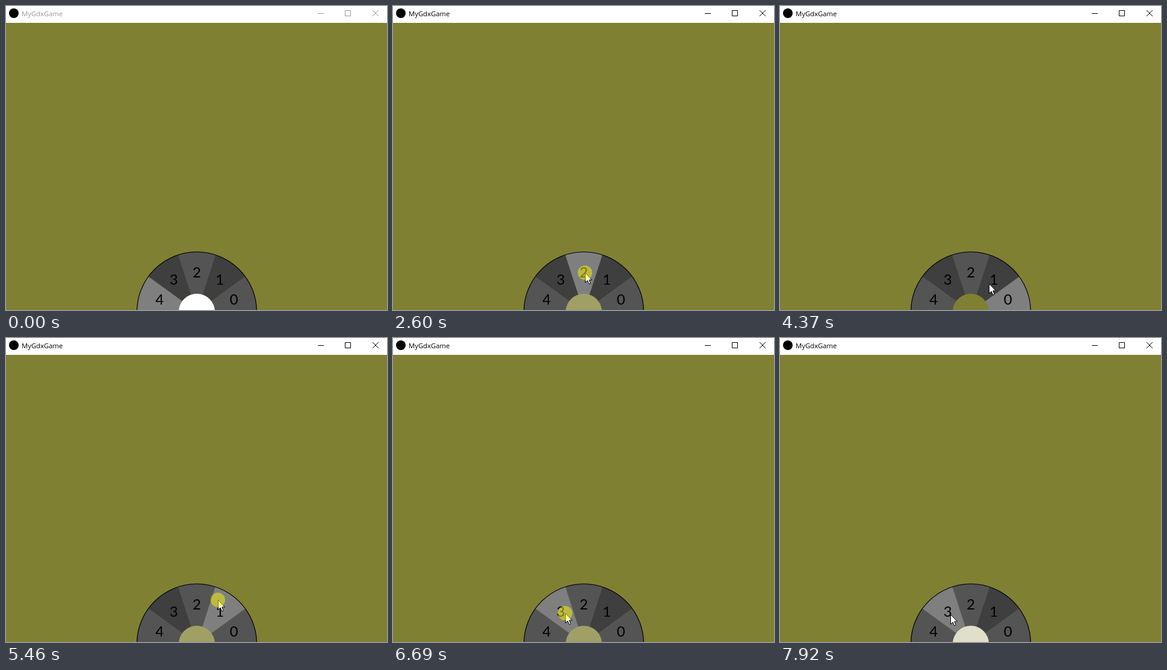
Animation of 633 by 505 pixels, one loop 8 s. Source, as an HTML page with a canvas:

```html
<!DOCTYPE html>
<html lang="en">
<head>
<meta charset="utf-8">
<title>MyGdxGame</title>
<style>
  html, body { margin: 0; width: 100%; height: 100%; overflow: hidden; background: #808033; }
  canvas { display: block; }
</style>
</head>
<body>
<canvas id="stage" width="633" height="505"></canvas>
<script>
const ctx = document.getElementById('stage').getContext('2d');
const LOOP = 8000, FOCUS_AT = 70;
const CX = 317, CY = 508, OUTER = 100, INNER = 30, SLICE = Math.PI / 5;

// The pointer travels in wheel coordinates: angle in slices, distance from the hub.
const stops = [], presses = [];
const moveTo = (time, slice, radius = 60) => stops.push({ time, slice, radius });
const press = (start, end) => presses.push({ start, end });
function click(start, end) {
  const { slice, radius } = stops[stops.length - 1];
  moveTo(end, slice, radius);
  press(start, end);
}

moveTo(150, 0.3, 280);
moveTo(860, 2, 180);
moveTo(1210, 1.84, 114);
moveTo(1670, 1.8);   click(2070, 2370);
moveTo(2520, 2.44, 65); click(2520, 2690);
moveTo(2850, 3.45);  click(2850, 3000);
moveTo(3300, 4.24, 46); click(3450, 3600);
moveTo(3960, 0.76);  click(3980, 4140);
moveTo(4370, 1.59, 56);
moveTo(4700, 1.84);  click(4810, 5000);
click(5150, 5230);

// Drag out of the wheel, then sweep back and forth over it
moveTo(5380, 1.84);
press(5380, 7920);
moveTo(5720, 1.43, 206);
moveTo(6000, 1.71, 146);
moveTo(6230, 1.71, 146);
moveTo(6400, 1.9);
moveTo(6920, 4.4);
moveTo(7150, 1.93);
moveTo(7690, 3.46);

const mix = (a, b, k) => a + (b - a) * k;

function pointerAt(t) {
  if (t < stops[0].time) return null;
  const next = stops.findIndex(s => s.time > t);
  if (next < 0) return stops[stops.length - 1];
  const a = stops[next - 1], b = stops[next];
  const k = (t - a.time) / (b.time - a.time);
  const eased = k * k * (3 - 2 * k);
  return { slice: mix(a.slice, b.slice, eased), radius: mix(a.radius, b.radius, eased) };
}

function toStage(slice, radius) {
  return [CX + radius * Math.cos(slice * SLICE), CY - radius * Math.sin(slice * SLICE)];
}

function sliceUnder({ slice, radius }) {
  return radius < INNER || radius > OUTER ? -1 : Math.floor(slice);
}

function selectedAt(t) {
  const last = presses.filter(p => p.end <= t).pop();
  return last ? sliceUnder(pointerAt(last.end)) : 4;
}

function disc(x, y, r, color) {
  ctx.fillStyle = color;
  ctx.beginPath();
  ctx.arc(x, y, r, 0, Math.PI * 2);
  ctx.fill();
}

function drawTitleBar(focused) {
  const color = focused ? '#000' : '#999';
  ctx.fillStyle = '#fff';
  ctx.fillRect(0, 0, 633, 28);
  disc(13, 12, 8, '#000');
  ctx.fillStyle = color;
  ctx.font = '11.3px "Open Sans", "Noto Sans", sans-serif';
  ctx.textAlign = 'left';
  ctx.fillText('MyGdxGame', 26, 17);
  ctx.strokeStyle = color;
  ctx.lineWidth = 1;
  ctx.stroke(new Path2D('M518 12.5h10M563.5 7.5h9v9h-9zM609 7l10 10M619 7l-10 10'));
}

function drawWheel(highlighted, selected) {
  for (let i = 0; i < 5; i++) {
    ctx.fillStyle = i === highlighted ? '#7f7f7f' : i % 2 ? '#3f3f3f' : '#545454';
    ctx.beginPath();
    ctx.arc(CX, CY, OUTER, -i * SLICE, -(i + 1) * SLICE, true);
    ctx.arc(CX, CY, INNER, -(i + 1) * SLICE, -i * SLICE);
    ctx.fill();
  }
  disc(CX, CY, INNER, `rgba(255,255,255,${selected / 4})`);

  ctx.strokeStyle = '#000';
  ctx.lineWidth = 1.2;
  ctx.beginPath();
  ctx.arc(CX, CY, OUTER - 0.5, Math.PI, 0);
  ctx.stroke();

  ctx.fillStyle = '#000';
  ctx.font = '24px Lato, sans-serif';
  ctx.textAlign = 'center';
  for (let i = 0; i < 5; i++) {
    const [x, y] = toStage(i + 0.5, 65);
    ctx.fillText(i, x, y + 8);
  }
}

const arrow = new Path2D('M.5 .5V16.5L4.2 13L6.5 18.5H8.5L9 17.5L6.8 12H11.5Z');

function drawPointer([x, y], pressed) {
  ctx.save();
  ctx.translate(Math.round(x), Math.round(y));
  ctx.fillStyle = '#fff';
  ctx.strokeStyle = '#000';
  ctx.lineWidth = 1;
  ctx.fill(arrow);
  ctx.stroke(arrow);
  if (pressed) disc(0, 0, 12, 'rgba(255,255,0,.47)');
  ctx.restore();
}

function draw(t) {
  const pointer = pointerAt(t);
  const pressed = presses.some(p => t >= p.start && t < p.end);
  const selected = selectedAt(t);
  ctx.fillStyle = '#808033';
  ctx.fillRect(0, 0, 633, 505);
  drawTitleBar(t >= FOCUS_AT);
  drawWheel(pressed ? sliceUnder(pointer) : selected, selected);
  if (pointer) drawPointer(toStage(pointer.slice, pointer.radius), pressed);
}

const startTime = performance.now();
function frame() {
  draw((performance.now() - startTime) % LOOP);
  requestAnimationFrame(frame);
}
frame();
</script>
</body>
</html>
```
